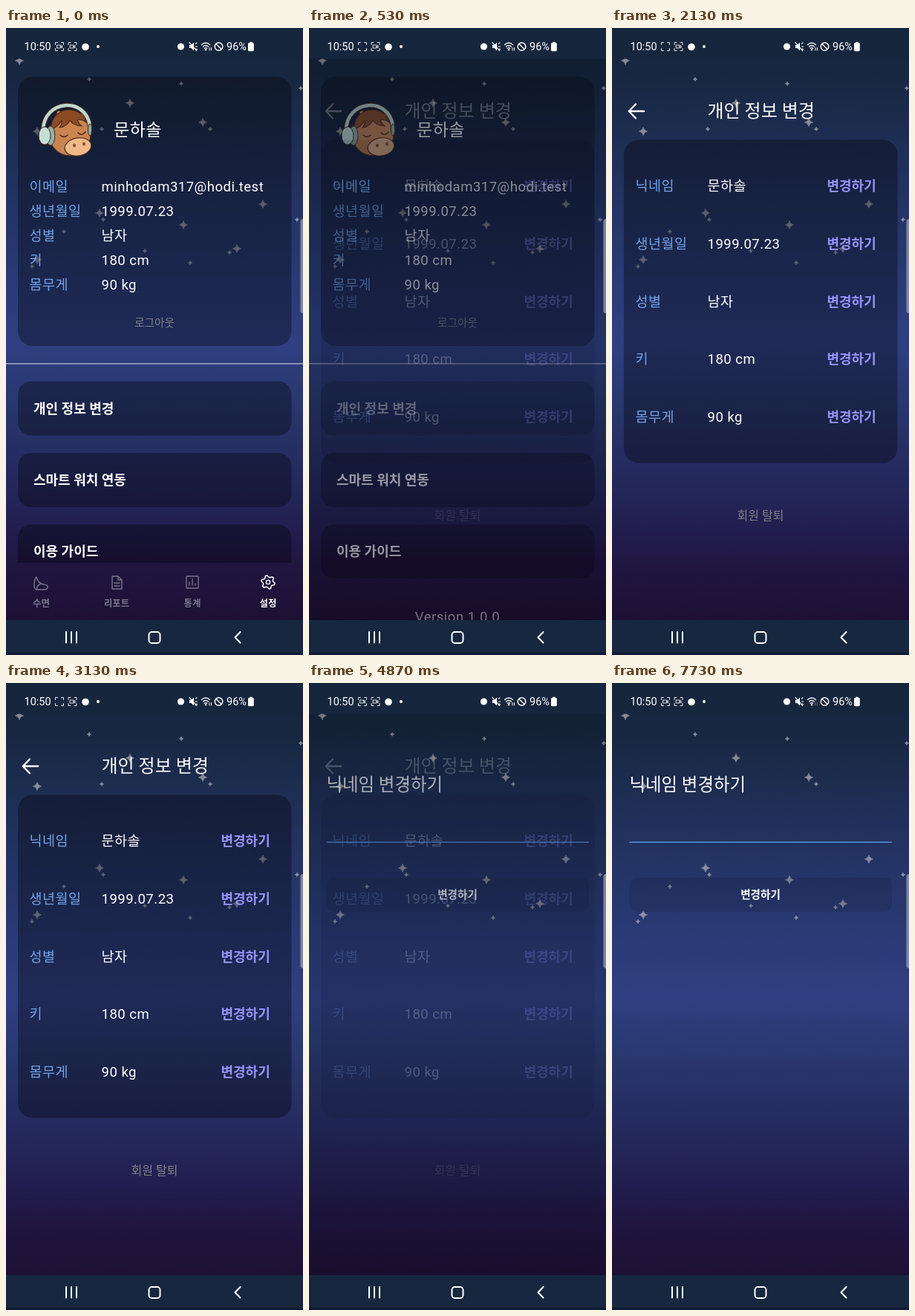
Animation of 400x844 px, one loop 8000 ms. Source, as an HTML page:

```html
<!DOCTYPE html>
<html lang="ko">
<head>
<meta charset="utf-8">
<style>
html, body { margin: 0; height: 100%; overflow: hidden; background: #16273d; }
svg { display: block; width: 400px; height: 844px; }
text { font-family: Roboto, "Noto Sans CJK KR", "Noto Sans CJK", sans-serif; white-space: pre; }
.row { font-size: 18.5px; letter-spacing: .5px; }
.line { fill: none; stroke-linecap: round; stroke-linejoin: round; }
</style>
</head>
<body>
<svg id="stage" viewBox="0 0 400 844"></svg>
<script>
const stage = document.getElementById('stage');
const LABEL = '#6fa3ea', ACTION = '#9792fb', MUTED = '#808288', TAB = '#77778c';

const text = (s, x, y, size, fill = '#fff', extra = '') =>
  `<text x="${x}" y="${y}" font-size="${size}" fill="${fill}" ${extra}>${s}</text>`;
const mid = 'text-anchor="middle"';
const bold = 'font-weight="600"';
const row = (s, x, y, fill) => text(s, x, y, 18.5, fill, 'class="row"');
const box = (x, y, w, h, r, fill, extra = '') =>
  `<rect x="${x}" y="${y}" width="${w}" height="${h}" rx="${r}" fill="${fill}" ${extra}/>`;
const card = (y, h, r, extra) => box(16, y, 368.5, h, r, 'rgba(0,0,0,.33)', extra);
const line = (d, color = '#fff', w = 1.4, extra = '') =>
  `<path class="line" d="${d}" stroke="${color}" stroke-width="${w}" ${extra}/>`;
const dot = (x, y, r, fill, ry = r, extra = '') =>
  `<ellipse cx="${x}" cy="${y}" rx="${r}" ry="${ry}" fill="${fill}" ${extra}/>`;

const sky = [[0, '#17273f'], [60, '#17273f'], [200, '#22315d'], [300, '#27386f'], [380, '#2d3d7c'],
  [425, '#2f3f81'], [500, '#29386f'], [600, '#242a5e'], [680, '#221d4e'], [720, '#201642'], [797, '#1d1033']];
const gradient = `<linearGradient id="sky" gradientUnits="userSpaceOnUse" x1="0" y1="0" x2="0" y2="797">${
  sky.map(([y, c]) => `<stop offset="${y / 797}" stop-color="${c}"/>`).join('')}</linearGradient>`;

const star = (x, y, r) => {
  const q = r * .16;
  return `<path transform="translate(${x} ${y})" d="M0 ${-r}Q${q} ${-q} ${r} 0Q${q} ${q} 0 ${r}Q${-q} ${q} ${-r} 0Q${-q} ${-q} 0 ${-r}"/>`;
};
const big = [[18, 44], [167, 101], [265, 127], [42, 139], [126, 249], [239, 265], [346, 237], [311, 297], [42, 312]];
const small = [[112, 69], [236, 75], [275, 136], [397, 81], [129, 136], [131, 258], [78, 274], [392, 258],
  [187, 300], [248, 316], [301, 302], [35, 321]];
const stars = `<g fill="#c3c3c8" stroke="#c3c3c8" stroke-width=".7" opacity=".65">${
  big.map(([x, y]) => star(x, y, 5.5)).join('')}${small.map(([x, y]) => star(x, y, 2.7)).join('')}</g>`;

const ink = '#4a2a1c';
const avatar = `<g stroke="${ink}" stroke-width="1.2">
  ${dot(86, 143, 28, '#c98450', 29)}
  <path fill="#d79a6a" d="M70 122Q65 109 74 112L82 120ZM97 118Q107 108 109 116L108 127Z"/>
  <path fill="#8c4a24" d="M60 137Q62 112 84 110Q101 110 108 126Q101 122 96 124Q99 130 102 132Q91 132 86 124Q82 133 72 134Q76 129 75 125Q69 134 60 137Z"/>
  ${dot(97, 160, 18, '#f0b988', 12, 'transform="rotate(-10 97 160)"')}</g>
  ${dot(92, 158, 2, '#8c5230', 2.6)}${dot(105, 156, 2, '#8c5230', 2.6)}
  ${line('M73 144Q78 149 83 144M97 141Q102 146 107 140', ink, 1.6)}
  ${line('M50 138C50 96 108 92 113 132', ink, 6.5)}${line('M50 138C50 96 108 92 113 132', '#bcd8cf', 4.5)}
  ${dot(60, 145, 6, '#8fb0a8', 13, `stroke="${ink}"`)}${dot(52, 145, 8, '#c4ded5', 12, `stroke="${ink}"`)}
  ${dot(113, 137, 2.5, '#8fb0a8', 8, `stroke="${ink}"`)}`;

const profile = [['이메일', 'minhodam317@hodi.test'], ['생년월일', '1999.07.23'], ['성별', '남자'], ['키', '180 cm'], ['몸무게', '90 kg']];
const nickname = '문하솔';
const menu = ['개인 정보 변경', '스마트 워치 연동', '이용 가이드'];

const settings = card(65.5, 362.5, 20) + avatar + text(nickname, 145, 145.3, 23, '#fff', 'letter-spacing=".5"') +
  profile.map(([k, v], i) => row(k, 31.5, 219.7 + 33 * i, LABEL) + row(v, 128.5, 219.7 + 33 * i, '#fff')).join('') +
  text('로그아웃', 200, 402, 14.7, MUTED, mid) + box(0, 451.3, 400, 1.2, 0, '#c3c7dc') +
  menu.map((s, i) => `<g id="menu${i}">${card(475.5 + 96.4 * i, 73, 18)}${text(s, 37, 518.5 + 96.4 * i, 18, '#fff', bold)}</g>`).join('') +
  text('Version 1.0.0', 200, 799, 18.5, '#c4c4ca', mid + ' class="row"');

const edit = line('M43 112H23M32 102.5L22.8 112L32 121.5', '#fff', 2.4) + text(menu[0], 128.5, 120.2, 24) + card(150.5, 435, 20) +
  [['닉네임', nickname], ...profile.slice(1)].map(([k, v], i) => {
    const y = 219 + 77.75 * i;
    return row(k, 31.5, y, LABEL) + row(v, 128.5, y, '#fff') + text('변경하기', 289.5, y, 18, ACTION, bold);
  }).join('') + text('회원 탈퇴', 200, 661.5, 16, MUTED, mid);

const rename = text('닉네임 변경하기', 23.5, 145, 23.4) + box(23.5, 213.6, 353.5, 1.4, 0, '#5b9ae2') +
  box(23.5, 262, 353.5, 46, 10, 'rgba(20,20,40,.16)') + text('변경하기', 200, 290.3, 14.6, '#fff', mid + ' ' + bold);

const gear = Array.from({ length: 24 }, (_, i) => {
  const a = (i + .5) * Math.PI / 12, r = i % 4 < 2 ? 9.2 : 6.8;
  return `${i ? 'L' : 'M'}${353 + r * Math.cos(a)} ${746 + r * Math.sin(a)}`;
}).join('') + 'Z';
const tabs = line('M41 739Q43 748 51 749Q57 750 56 753Q55 756 51 756H41Q37 754 38 749Q38 742 41 739M42 756Q41 750 46 749', TAB) +
  line('M143 738H151L156 743V755H143ZM151 738V743H156M146 747H153M146 751H153', TAB) +
  line('M244 738H258Q259 738 259 739V753Q259 754 258 754H244Q243 754 243 753V739Q243 738 244 738M247 750V746M251 750V742M255 750V748', TAB) +
  line(gear, '#fff', 1.5) + dot(353, 746, 2.6, 'none', 2.6, 'stroke="#fff" stroke-width="1.4"') +
  ['수면', '리포트', '통계', '설정'].map((s, i) =>
    text(s, [47.5, 149, 251, 353][i], 778.5, 12.4, i < 3 ? TAB : '#fff', mid + ' ' + bold)).join('');

const bracket = x => line(`M${x - 5.5} 22.5V19.5H${x - 2.5}M${x + 2.5} 19.5H${x + 5.5}V22.5M${x + 5.5} 27.5V30.5H${x + 2.5}M${x - 2.5} 30.5H${x - 5.5}V27.5`, '#e4e7ec', 1);
const camera = x => line(`M${x - 3} 23H${x + 1.5}V27H${x - 3}ZM${x + 1.5} 25L${x + 3.5} 23.5V26.5Z`, '#e4e7ec', 1);
const status = box(0, 0, 400, 41.5, 0, '#16263d') + text('10:50', 24.5, 30.2, 14.5) +
  bracket(72) + `<g id="rec">${camera(72)}</g>` + bracket(89.5) + camera(89.5) +
  dot(107, 25.5, 4.8, '#fff') + dot(124, 25, 2, '#fff') + dot(235.5, 25, 4.6, '#fff') +
  '<path fill="#fff" d="M247 23H249.5L253 19.5V30.5L249.5 27H247Z"/>' +
  line('M247 19.5L256.5 30.5M255.5 21L257 20M255.5 25H257.5M256 28L257.5 29', '#fff', 1.2) +
  line('M263.5 22.5Q269 17.5 274.5 22.5M265.5 25Q269 22 272.5 25M267.3 27.3Q269 26 270.7 27.3', '#fff', 1.3) + dot(269, 29.3, 1.2, '#fff') +
  `<g id="data">${line('M274 26.5V30M276.5 26.5V30', '#fff', 1)}</g>` +
  dot(286.5, 25, 5.3, 'none', 5.3, 'stroke="#fff" stroke-width="1.5"') + line('M283 21.5L290 28.5', '#fff', 1.5) +
  text('96%', 297, 30.2, 14.5) + box(326, 20, 7.8, 11.2, 1.4, '#fff') + box(328, 18.7, 3.8, 2, .5, '#fff');

const nav = box(0, 797, 400, 47, 0, '#16273f') + box(0, 840.5, 400, 4, 0, '#0f1b33') +
  line('M81 813V827.5M88 813V827.5M95 813V827.5', '#fff', 2) +
  box(192.5, 813, 15, 15, 4, 'none', 'stroke="#fff" stroke-width="2"') + line('M315.5 813L308.5 820.3L315.5 827.6', '#fff', 2.1);

stage.innerHTML = `<defs>${gradient}<clipPath id="clip"><rect id="view" width="400" height="720"/></clipPath></defs>
  ${box(0, 0, 400, 844, 0, 'url(#sky)')}${stars}
  <g id="settings" clip-path="url(#clip)">${settings}</g><g id="edit">${edit}</g><g id="rename">${rename}</g>
  <g id="tabs">${tabs}</g>${box(0, 0, 400, 844, 0, '#000', 'id="dim"')}
  ${status}${nav}${box(396.5, 257, 8, 127, 3.5, '#a0a3b0', 'opacity=".75"')}`;

const clamp = v => Math.max(0, Math.min(1, v));
const set = (id, name, v) => document.getElementById(id).setAttribute(name, v);
const fade = (id, v) => set(id, 'opacity', v);
const FIRST = 400, SECOND = 4600;
const mix = d => clamp((d - 45) / 300);
// Quick darkening as a page change starts, then a slow recovery.
const shade = d => d < 0 || d > 800 ? 0 : .22 * (d < 100 ? d / 100 : ((800 - d) / 700) ** 1.7);

function draw() {
  const t = performance.now() % 8000;
  const a = mix(t - FIRST), b = mix(t - SECOND);
  fade('settings', 1 - a);
  fade('edit', a * (1 - b));
  fade('rename', b);
  fade('dim', shade(t - FIRST) + shade(t - SECOND));
  fade('menu0', 1 - .4 * clamp((t - FIRST) / 100));
  fade('tabs', t < FIRST ? 1 : 0);
  set('view', 'height', t < FIRST ? 720 : 797);
  const blink = (t - (t > 5700 ? 65 : 0)) % 1000;
  fade('rec', blink >= 130 && blink < 665 ? 0 : 1);
  fade('data', t > 7700 ? .35 : 1);
  requestAnimationFrame(draw);
}
draw();
</script>
</body>
</html>
```
